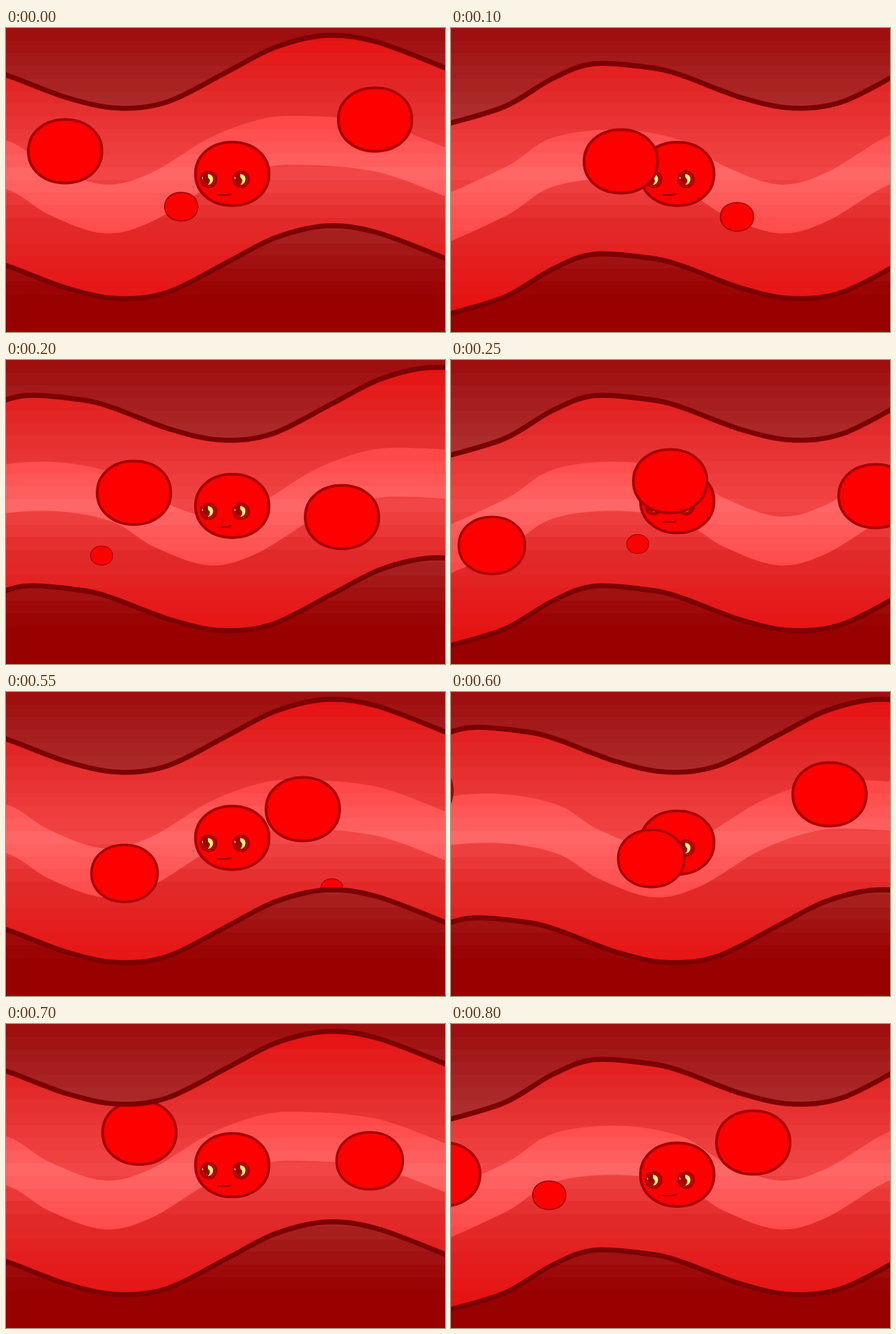
Write an HTML page that moves like this. It is 650 px wide and 450 px high and loops after 1.1 s.

```html
<!DOCTYPE html>
<html lang="en">
<head>
<meta charset="utf-8">
<title>Blood cells</title>
<style>
html, body { margin: 0; width: 100%; height: 100%; overflow: hidden; background: #900; }
svg { display: block; width: 650px; height: 450px; }
</style>
</head>
<body>
<svg viewBox="0 0 650 450">
  <defs id="defs">
    <path id="cell" d="M-54.5 0C-54.5 -27.500 -31.500 -47 0 -47S54.5 -27.500 54.5 0S31.500 47 0 47S-54.5 27.500 -54.5 0Z"
      fill="#f00" stroke="#a80000" stroke-width="4"/>
    <g id="eye">
      <circle r="12" fill="#b40800" stroke="#a00000" stroke-width="2"/>
      <ellipse cx="-3" cy="-2" rx="5" ry="7" fill="#a00000"/>
      <path d="M-1 -8Q6.500 -7 6.500 0Q6 7 -1 8Q3 4 1.500 0Q-2 -3 -1 -8Z" fill="#ffff80"/>
      <path d="M-10 -4l2 2l-1 2z" fill="#ffff80"/>
    </g>
  </defs>
  <rect width="650" height="450" fill="url(#flesh)"/>
  <g id="vein"></g>
  <g id="face">
    <use href="#cell"/>
    <use href="#eye" x="-35" y="8"/>
    <use href="#eye" x="13" y="8"/>
    <path d="M-22 31H-7Q-3 31 -2 28" fill="none" stroke="#a00000" stroke-width="2.5"/>
  </g>
  <g id="cells"></g>
  <g id="walls"></g>
</svg>
<script>
const $ = id => document.getElementById(id);

function add(parent, tag, attrs) {
  const el = document.createElementNS('http://www.w3.org/2000/svg', tag);
  for (const k in attrs) el.setAttribute(k, attrs[k]);
  return parent.appendChild(el);
}

// Linear value at t from keys [t, ...values]; runs on past both ends.
function sample(keys, t) {
  let i = 0;
  while (i < keys.length - 2 && keys[i + 1][0] < t) i++;
  const [a, b] = [keys[i], keys[i + 1]];
  const f = (t - a[0]) / (b[0] - a[0]);
  return a.slice(1).map((v, k) => v + (b[k + 1] - v) * f);
}

// Vertical gradient in flat bands; keys are [share of height, red, green and blue].
function bands(id, keys) {
  const grad = add($('defs'), 'linearGradient',
    { id, gradientUnits: 'userSpaceOnUse', x1: 0, y1: 0, x2: 0, y2: 450 });
  const count = 24;
  for (let i = 0; i < count; i++) {
    const [r, g] = sample(keys, (i + 0.5) / count).map(Math.round);
    for (const edge of [i, i + 1])
      add(grad, 'stop', { offset: edge / count, 'stop-color': `rgb(${r},${g},${g})` });
  }
}
bands('flesh', [[0, 158, 12], [0.45, 184, 66], [0.88, 153, 0], [1, 153, 0]]);
bands('blood', [[0, 232, 14], [0.2, 226, 40], [0.48, 242, 70], [0.64, 226, 42], [1, 232, 10]]);
bands('shine', [[0.29, 255, 68], [0.48, 255, 102], [0.69, 255, 72]]);

// Smooth curve through the points, moved down by dy, without the opening move.
function curve(pts, dy) {
  const at = i => pts[Math.max(0, Math.min(pts.length - 1, i))];
  let d = '';
  for (let i = 0; i < pts.length - 1; i++) {
    const [p, a, b, n] = [at(i - 1), at(i), at(i + 1), at(i + 2)];
    d += `C${a[0] + (b[0] - p[0]) / 6} ${a[1] + (b[1] - p[1]) / 6 + dy} ` +
      `${b[0] - (n[0] - a[0]) / 6} ${b[1] - (n[1] - a[1]) / 6 + dy} ${b[0]} ${b[1] + dy}`;
  }
  return d;
}
const line = (pts, dy) => `M${pts[0][0]} ${pts[0][1] + dy}${curve(pts, dy)}`;
const ribbon = (pts, top, low) => {
  const back = [...pts].reverse();
  return `${line(pts, top)}L${back[0][0]} ${back[0][1] + low}${curve(back, low)}Z`;
};

// Key points of the vein's upper wall and of the light stream's lower edge.
const wall = [
  [-345, 142], [-260, 116], [-190, 75], [-130, 53], [-50, 58], [0, 69.5],
  [90, 103], [165, 118.5], [240, 109], [330, 63.5], [400, 28], [475, 11], [550, 21], [655, 61]
];
const stream = [
  [-345, 318], [-255, 276], [-190, 235], [-95, 223], [0, 238.5], [65, 277],
  [145, 304], [215, 287], [300, 236], [375, 208], [440, 202.5], [550, 213], [655, 251]
];
const GAP = 282;
const FAR = 500;
const walls = $('walls');

add($('vein'), 'path', { d: ribbon(wall, 0, GAP), fill: 'url(#blood)' });
add($('vein'), 'path', { d: ribbon(stream, -72.5, 0), fill: 'url(#shine)' });
for (const [edge, away] of [[0, -FAR], [GAP, FAR]]) {
  add(walls, 'path', { d: ribbon(wall, edge, edge + away), fill: 'url(#flesh)' });
  add(walls, 'path', { d: line(wall, edge), fill: 'none', stroke: '#7c0000', 'stroke-width': 7.5 });
}

// Drifting cells: keys are [step, x, y].
const STEPS = 12;
const drifters = [
  { size: 1, keys: [[11, -12, 222], [12, 87, 182], [14, 251, 197], [16, 497, 232], [17, 628, 201]] },
  { size: 1, keys: [[4, 189, 196], [5, 324, 179], [6, 439, 173], [8, 681, 129]] },
  { size: 1, keys: [[8, 72, 153], [11, 447, 175], [12, 546, 135]] },
  { size: 0.9, keys: [[5, 60, 274], [6, 175, 268], [8, 417, 224]] },
  { size: 0.45, keys: [[11, 145, 253], [12, 259, 264], [14, 423, 279], [15, 560, 300]] },
  { size: 0.3, keys: [[4, 141, 289], [5, 276, 272], [6, 482, 290]] }
];
for (const c of drifters) c.el = add($('cells'), 'use', { href: '#cell' });

const place = (el, x, y, size = 1) =>
  el.setAttribute('transform', `translate(${x + 0.5} ${y + 0.5}) scale(${size})`);

// Steps last 50 ms, with a long hold after each half.
function stepAt(ms) {
  const half = ms < 550 ? 0 : 6;
  return half + Math.min(5, Math.floor((ms - (half && 550)) / 50));
}

const SWAY = [0, 155, 340];

function draw(ms) {
  const step = stepAt(ms);
  for (const id of ['vein', 'walls'])
    $(id).setAttribute('transform', `translate(${SWAY[step % 3]})`);
  place($('face'), 334.5, 215.5 - 7 * Math.round(Math.sin(step * Math.PI / 2)));
  for (const { el, size, keys } of drifters) {
    const first = keys[0][0] - 2;
    const [x, y] = sample(keys, first + (step - first + STEPS) % STEPS);
    place(el, x, y, size);
  }
}

const start = performance.now();
function tick() {
  draw((performance.now() - start) % 1100);
  requestAnimationFrame(tick);
}
tick();
</script>
</body>
</html>
```
